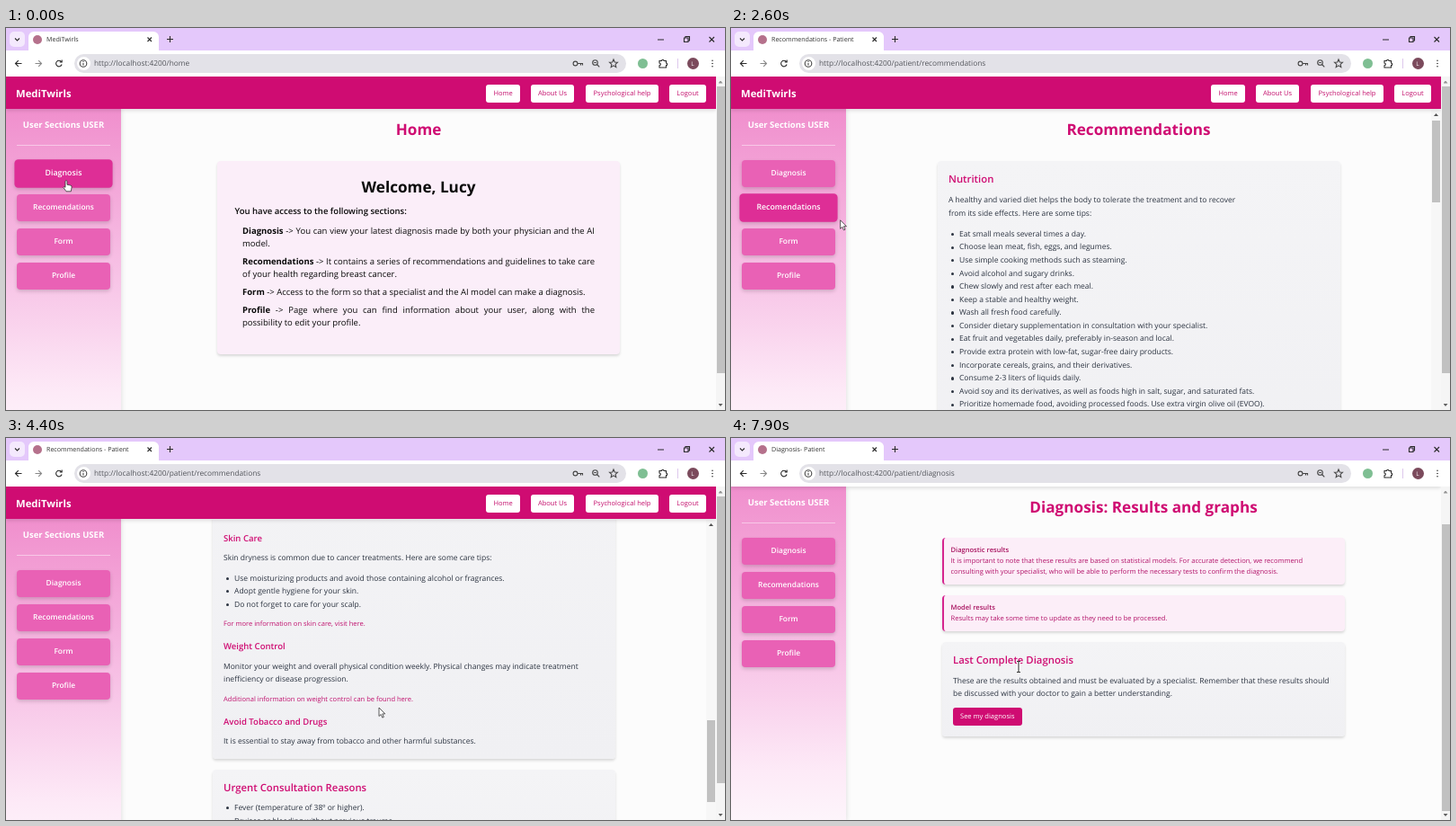
Recreate the animation shown at these times as an HTML page. Size 800 px wide and 425 px high, loop 8000 ms.

```html
<!DOCTYPE html>
<html lang="en">
<head>
<meta charset="utf-8">
<title>Patient portal</title>
<style>
html, body { margin: 0; width: 100%; height: 100%; overflow: hidden; background: #fff; }
div { position: absolute; box-sizing: border-box; }
#stage { left: 0; top: 0; width: 800px; height: 425px; overflow: hidden; background: #fcfcfc;
  font-family: "Open Sans", "Noto Sans", sans-serif; text-rendering: geometricPrecision; }
svg { position: absolute; left: 0; top: 0; }
.t { white-space: nowrap; line-height: 20px; }
.c { transform: translateX(-50%); }
.card { border-radius: 4px; box-shadow: 0 2px 3px rgba(0,0,0,.14); }
.grey { background: linear-gradient(#f4f4f6, #f0f0f3); }
</style>
</head>
<body>
<div id="stage"></div>
<script>
const LOOP = 8000, PINK = '#cf0c72', HOT = '#df3095', INK = '#2b3340', SOFT = '#434c59';
let root = document.getElementById('stage');
const stage = root;

// Drawing helpers: everything is placed in stage coordinates
function box(x, y, w, h, css = '', cls = '', html = '') {
  const d = document.createElement('div');
  d.className = cls;
  d.style.cssText = `left:${x}px;top:${y}px;width:${w}px;height:${h}px;${css}`;
  d.innerHTML = html;
  root.append(d);
  return d;
}
function text(x, y, size, s, css = '', cls = '') {
  return box(x, y - 10, 0, 20, `width:max-content;font-size:${size}px;${css}`, 't ' + cls, s);
}
function inside(parent, draw) {
  const old = root;
  root = parent;
  draw();
  root = old;
}
const h1 = (x, y, s, color = PINK) => text(x, y, 17.15, s, `font-weight:700;color:${color}`, 'c');
const h3 = (x, y, s, cls) => text(x, y, 11.35, s, `font-weight:600;color:${PINK}`, cls);
const h4 = (x, y, s, color = PINK) => text(x, y, 9.55, s, `font-weight:600;color:${color}`);
const body = (x, y, s, cls) => text(x, y, 8.5, s, `color:${INK}`, cls);
const small = (x, y, s, css = `color:${SOFT}`, cls) => text(x, y, 7.56, s, css, cls);
const link = (y, s) => small(242, y, s, 'color:#c0136f');
const card = (x, y, w, h, css, cls = 'grey') => box(x, y, w, h, css, 'card ' + cls);
const lines = (x, y, list) => list.forEach((s, i) => body(x, y + i * 14.58, s));
function bullets(y, list) {
  list.forEach((_, i) => box(245, y + i * 14.58 - 1.8, 3.2, 3.2, `background:${INK};border-radius:50%`));
  lines(254, y, list);
}
function button(x, y, w, h, s, bg, radius = 3) {
  box(x, y, w, h, `background:${bg};border-radius:${radius}px`);
  small(x + w / 2, y + h / 2, s, 'color:#fff', 'c');
}

// Page frame
const view = box(0, 54, 790, 371, 'overflow:hidden');
let web, main, pages = {}, thumb, bar, sideButtons;
inside(view, () => web = box(0, -54, 790, 500));
inside(web, () => {
  main = box(128, 91, 662, 371, 'overflow:hidden;background:#fcfcfc');
  box(0, 90, 128, 372, 'background:linear-gradient(#f08fcd,#f7c3e6 50%,#fdeaf7 85%,#fdf5fb);box-shadow:1px 0 5px rgba(0,0,0,.1)');
  text(64, 108, 9.5, 'User Sections USER', 'font-weight:700;color:#fff', 'c');
  box(12, 130, 104, 1, 'background:rgba(255,255,255,.45)');
  sideButtons = ['Diagnosis', 'Recomendations', 'Form', 'Profile'].map((s, i) => {
    const b = box(12, 147 + 38 * i, 104, 30.3, 'border-radius:4px;box-shadow:0 2px 4px rgba(0,0,0,.16)');
    inside(b, () => text(52, 15.2, 8.4, s, 'font-weight:600;color:#fff', 'c'));
    return b;
  });
  box(0, 54.4, 790, 36, `background:${PINK};box-shadow:0 2px 4px rgba(0,0,0,.12)`);
  text(11, 73.5, 11.3, 'MediTwirls', 'font-weight:700;color:#fff');
  [[534, 38, 'Home'], [584, 48, 'About Us'], [645, 81, 'Psychological help'], [738, 41, 'Logout']].forEach(([x, w, s]) => {
    box(x - .3, 62.5, w + .6, 20.3, 'background:#fff;border-radius:3px');
    text(x + w / 2, 73.2, 7.5, s, 'font-weight:500;color:#c4126e', 'c');
  });
});

function page(name, title, path, extra, draw) {
  inside(main, () => {
    const el = box(-128, -91, 790, 1600);
    pages[name] = { el, title, path, ...extra };
    inside(el, draw);
  });
}
// Draws a block shifted down by dy
const shifted = (dy, draw) => inside(box(0, dy, 790, 1), draw);

page('home', 'MediTwirls', 'home', {}, () => {
  h1(459, 114, 'Home');
  card(235, 148, 448, 215, 'background:#fbeef9', '');
  h1(459, 178, 'Welcome, Lucy', '#0a0a0a');
  h4(254.5, 204, 'You have access to the following sections:', '#0a0a0a');
  const row = (y, s, fill) =>
    box(263, y - 10, 392, 20, `font-size:9.5px;color:#0a0a0a;text-align-last:${fill ? 'justify' : 'left'}`, 't', s);
  row(226, '<b>Diagnosis</b> -&gt; You can view your latest diagnosis made by both your physician and the AI', true);
  row(240, 'model.');
  row(260, '<b>Recomendations</b> -&gt; It contains a series of recommendations and guidelines to take care', true);
  row(274, 'of your health regarding breast cancer.');
  row(294, '<b>Form</b> -&gt; Access to the form so that a specialist and the AI model can make a diagnosis.');
  row(314, '<b>Profile</b> -&gt; Page where you can find information about your user, along with the', true);
  row(328, 'possibility to edit your profile.');
});

page('profile', 'Profile - Patient', 'patient/profile', { thumb: 218, max: 220 }, () => {
  h1(453.5, 114, 'Profile');
  shifted(67, () => {
    card(168, 83, 571, 129, 'background:#fdfdfd', '');
    [[180, 95, 'Name:', 'Lucy', 1], [458, 95, 'Reference Hospital:', 'Hospital Valle de Lumera', 1],
     [180, 151, 'Zone:', 'Madrid', 1], [458, 151, 'Assigned Doctor:', 'Rosa', 0]].forEach(([x, y, k, v, edit]) => {
      box(x, y, 269.5, 48.5, 'border:1px solid #ececef;border-radius:4px');
      small(x + 8.5, y + 14, k, `font-weight:600;color:${SOFT}`);
      small(x + 8.5, y + (edit ? 30 : 26.5), v, 'color:#1f2937');
      if (edit) button(x + 235.5, y + 19.5, 25.5, 20.5, 'Edit', HOT, 10.5);
    });
    box(168, 224, 571, 1.6, `background:${PINK}`);
    [[168, 238, 'Form', 'Complete your information.', 'Go to form', 55],
     [459.5, 238, 'Diagnosis and Statistics', 'Check the diagnoses and health trends.', 'Consult statistics', 75],
     [168, 332, 'Recommendations', 'Our professionals want to advise you for your well-being.', 'Consult recommendations', 109]
    ].forEach(([x, y, head, info, label, w]) => {
      card(x, y, 280, 82);
      h4(x + 12, y + 19, head);
      small(x + 12, y + 36, info);
      button(x + 12, y + 49.5, w, 20, label, HOT);
    });
  });
  shifted(182, () => {
    box(229.5, 310.5, 448, 1.6, `background:${PINK}`);
    card(241, 336, 424.5, 84, `background:#fdfdfd;border-top:2px solid ${PINK}`, '');
    h3(453.5, 358.5, 'Your data is important to us!', 'c');
    const strong = s => `<b style="color:${PINK}">${s}</b>`;
    body(453.5, 381, `We remind you that you can consult our ${strong('Privacy Policy')} and the ${strong('Informed Consent')}`, 'c');
    small(453.5, 402, 'If you have any questions, feel free to contact us.', undefined, 'c');
  });
});

page('recs', 'Recommendations - Patient', 'patient/recommendations', { thumb: 91, max: 1044 }, () => {
  h1(453.5, 114, 'Recommendations');
  const panel = (top, bottom) => card(229.5, top, 448, bottom - top);
  shifted(241, () => {
    panel(-93, 254.5);
    h3(242, -72, 'Nutrition');
    lines(242, -49, ['A healthy and varied diet helps the body to tolerate the treatment and to recover',
      'from its side effects. Here are some tips:']);
    bullets(-11.2, ['Eat small meals several times a day.', 'Choose lean meat, fish, eggs, and legumes.',
      'Use simple cooking methods such as steaming.', 'Avoid alcohol and sugary drinks.',
      'Chew slowly and rest after each meal.', 'Keep a stable and healthy weight.', 'Wash all fresh food carefully.',
      'Consider dietary supplementation in consultation with your specialist.',
      'Eat fruit and vegetables daily, preferably in-season and local.',
      'Provide extra protein with low-fat, sugar-free dairy products.',
      'Incorporate cereals, grains, and their derivatives.', 'Consume 2-3 liters of liquids daily.',
      'Avoid soy and its derivatives, as well as foods high in salt, sugar, and saturated fats.',
      'Prioritize homemade food, avoiding processed foods. Use extra virgin olive oil (EVOO).']);
    lines(242, 201, ['Remember not to obsess over food. A balance and variety of nutrition, combined with moderate exercise,', 'is essential.']);
    link(237, 'For more information on nutrition, consult here.');
    panel(266.5, 430);
    h3(242, 287, 'Physical Activity');
    lines(242, 310, ['Regular exercise strengthens the physical and mental condition of the patient, helping to avoid some side', 'effects of the treatment.']);
    bullets(347.5, ['Engage in at least 30 minutes of physical activity daily.',
      'Avoid physical inactivity and resume your daily activities after the diagnosis.',
      'Include aerobic exercises, flexibility, stretching, and resistance exercises.',
      'Prefer outdoor activities that promote social interaction.']);
    link(412.5, 'More about the importance of exercise can be found here.');
  });
  shifted(860, () => {
    panel(-177, -64);
    h3(242, -156, 'Emotional Health');
    lines(242, -133, ['It is normal to feel fear, sadness, or anger after a diagnosis. Share your feelings with',
      'the people close to you and ask for professional help whenever you need it.', 'You are not alone.']);
    link(-82, 'For more information on emotional health, visit here.');
    panel(-52, 356.5);
    h3(242, -32, 'General Care');
    h4(242, -9, 'Rest and Sleep');
    body(242, 13.5, 'Tiredness is common during treatment. Here are some care tips:');
    bullets(36, ['Keep a regular sleep schedule.', 'Take short breaks during the day.', 'Avoid screens before going to bed.']);
    link(87, 'For more information on rest, visit here.');
    h4(242, 112, 'Skin Care');
    body(242, 134, 'Skin dryness is common due to cancer treatments. Here are some care tips:');
    bullets(156.5, ['Use moisturizing products and avoid those containing alcohol or fragrances.',
      'Adopt gentle hygiene for your skin.', 'Do not forget to care for your scalp.']);
    link(207, 'For more information on skin care, visit here.');
    h4(242, 232, 'Weight Control');
    lines(242, 254.5, ['Monitor your weight and overall physical condition weekly. Physical changes may indicate treatment', 'inefficiency or disease progression.']);
    link(290.5, 'Additional information on weight control can be found here.');
    h4(242, 315.5, 'Avoid Tobacco and Drugs');
    body(242, 337.5, 'It is essential to stay away from tobacco and other harmful substances.');
    panel(369, 505);
    h3(242, 389.5, 'Urgent Consultation Reasons');
    bullets(412, ['Fever (temperature of 38º or higher).', 'Bruises or bleeding without previous trauma.',
      'Allergic reaction.', 'Severe vomiting or diarrhea.', 'Shortness of breath or persistent cough.',
      'Intense abdominal or chest pain.']);
    panel(517, 614);
    h3(453.5, 537.5, 'Hope and Support', 'c');
    body(453.5, 560, 'Remember that a breast cancer diagnosis is not the end. There are numerous treatment and support', 'c');
    body(453.5, 574.6, 'options that allow you to maintain hope and improve your quality of life.', 'c');
    link(596, 'For more information on care and support, visit here.');
  });
});

page('diagnosis', 'Diagnosis- Patient', 'patient/diagnosis', {}, () => shifted(36, () => {
  h1(459, 78, 'Diagnosis: Results and graphs');
  const note = (y, h, head, list) => {
    card(235, y, 448, h, 'background:#fceef8;border-left:2px solid #d6248f', '');
    small(244.5, y + 14, head, 'font-weight:600;color:#a8125f');
    list.forEach((s, i) => small(244.5, y + 26 + 12 * i, s, 'color:#b3146a'));
  };
  note(111, 52, 'Diagnostic results', [
    'It is important to note that these results are based on statistical models. For accurate detection, we recommend',
    'consulting with your specialist, who will be able to perform the necessary tests to confirm the diagnosis.']);
  note(175, 40, 'Model results', ['Results may take some time to update as they need to be processed.']);
  card(235, 227, 448, 105);
  h3(247, 247.5, 'Last Complete Diagnosis');
  lines(247, 270.5, ['These are the results obtained and must be evaluated by a specialist. Remember that these results should',
    'be discussed with your doctor to gain a better understanding.']);
  button(247, 300, 76.5, 20, 'See my diagnosis', PINK);
}));

// Scrollbars
const arrow = (x, y, up, color) =>
  box(x - 2.5, y - 1.5, 5, 3, `background:${color};clip-path:polygon(${up ? '0 100%,50% 0,100% 100%' : '0 0,50% 100%,100% 0'})`);
inside(web, () => {
  bar = box(779, 91, 11, 371, 'background:#f7f7f7');
  inside(bar, () => {
    arrow(5.5, 5.5, true, '#505050');
    arrow(5.5, 365.5, false, '#606060');
    thumb = box(1, 12, 9, 91, 'background:#c1c1c1');
  });
  web.insertBefore(bar, main.nextSibling);
});
box(790, 54, 10, 371, 'background:#f5f5f5');
arrow(795, 60, true, '#909090');
arrow(795, 419.5, false, '#606060');
const outerThumb = box(791, 65, 8.5, 319, 'background:#c1c1c1');

// Browser window
box(0, 0, 800, 25, 'background:#e4c8fb');
box(0, 25, 800, 29, 'background:#fff');
box(4, 4, 17, 17, 'background:#f4e9fd;border-radius:5px');
box(25, 4, 145, 22, 'background:#fff;border-radius:6px 6px 0 0');
box(29.5, 8, 10, 10, 'background:#b5718c;border-radius:50%');
const tabTitle = text(45, 13, 7.1, '', 'color:#333');
box(76, 29, 614, 21, 'background:#e3e2e8;border-radius:10.5px');
box(78.5, 32, 15, 15, 'background:#fff;border-radius:50%');
const url = text(98, 39.5, 8.33, '', 'color:#54565c');
box(702.5, 34, 11, 11, 'background:#7fbf93;border-radius:50%');
box(747, 34, 1, 11, 'background:#ddc8ec');
box(757.5, 33, 13, 13, 'background:#7b4a5c;border-radius:50%');
text(764, 39.5, 6.5, 'L', 'color:#fff', 'c');
stage.insertAdjacentHTML('beforeend', `<svg width="800" height="54" fill="none" stroke="#2b2b2b" stroke-width="1.1">
<path d="M10 11.5l2.5 2.5 2.5-2.5M157.5 10.5l4.5 4.5m0-4.5l-4.5 4.5M179 12.5h7m-3.5-3.5v7M725 13h7M754.5 11h4.5v4.5h-4.5zM756 11v-1.5h4.5v4.5h-1.5M782.5 10l5.5 5.5m0-5.5l-5.5 5.5"/>
<path d="M17.5 39.5h-7m3.3-3.3l-3.3 3.3 3.3 3.3M61.5 37.5a3.3 3.3 0 1 0 .6 3M62.2 35.5v2.5h-2.5"/>
<path stroke="#888" d="M32.5 39.5h7m-3.3-3.3l3.3 3.3-3.3 3.3"/>
<g stroke="#444"><circle cx="86" cy="39.5" r="3.8"/><path d="M86 39v2.5M86 37v1"/>
<circle cx="633.5" cy="39.5" r="2.4"/><path d="M636 39.5h5.5v2m-2-2v2"/>
<circle cx="655.5" cy="38.5" r="2.8"/><path d="M657.5 40.5l2.8 2.8M654.2 38.5h2.6"/>
<path d="M676 35l1.3 3 3.2.3-2.4 2.1.7 3.2-2.8-1.7-2.8 1.7.7-3.2-2.4-2.1 3.2-.3z"/></g>
<path d="M727 36.5h2.5a1.3 1.3 0 0 1 2.6 0h2.4v2.5a1.3 1.3 0 0 1 0 2.6v2.4h-7.5v-2.3a1.3 1.3 0 0 0 0-2.7z"/>
<path stroke-width="1.6" stroke-linecap="round" d="M786 36.2v.01M786 39.5v.01M786 42.8v.01"/></svg>
<svg id="mouse" width="18" height="20" style="overflow:visible" fill="#fff" stroke="#333" stroke-width=".8" stroke-linejoin="round">
<path d="M0 0v9.5l2.2-2 1.6 3.6 1.6-.7-1.6-3.5h3z"/>
<path d="M-1 1q1-1.6 2 0v4l4 .8q1.3.4 1.1 2l-.8 4.7h-5.3l-3.2-4.5q0-1.5 2.2 0z"/>
<path stroke-width="1.1" d="M-2-6.5h1.5q.5 0 .5.5v11q0 .5-.5.5h-1.5M2-6.5h-1.5q-.5 0-.5.5v11q0 .5.5.5h1.5"/></svg>`);
const mouse = document.getElementById('mouse');

// Motion: [time, values...]
const mousePath = [[0, 67, 169.3], [400, 64, 272], [500, 64, 272], [800, 402, 227], [1000, 402, 227], [1900, 406, 219],
  [2300, 66, 198], [2500, 66, 198], [2900, 422, 299], [3600, 422, 299], [4400, 415, 300], [4800, 415, 300],
  [5000, 795, 200], [5400, 795, 236], [5900, 64, 205], [6200, 70, 204], [6300, 96, 180], [6700, 430, 345],
  [7100, 66, 130], [7400, 66, 130], [7900, 320, 255]];
const scrolls = { profile: [[800, 0], [1000, 67], [1900, 182]], recs: [[2900, 0], [3200, 241], [4400, 860], [4800, 1044]] };
const outerScroll = [[5000, 0], [5400, 36]];
const visits = [[0, 'home'], [500, 'profile'], [2500, 'recs'], [7400, 'diagnosis']];
// [button, on, off]
const hovers = [[0, -500, 100], [1, 150, 220], [2, 240, 310], [3, 320, 550], [1, 2250, 2600], [2, 5850, 6300], [1, 6320, 6400], [0, 7000, 7500]];
const clamp = v => Math.max(0, Math.min(1, v));
const smooth = u => u * u * (3 - 2 * u);

function along(keys, t, ease = u => u) {
  const i = keys.findLastIndex(k => k[0] <= t);
  if (i < 0) return keys[0].slice(1);
  const a = keys[i], b = keys[i + 1] || a;
  const u = ease(clamp((t - a[0]) / (b[0] - a[0] || 1)));
  return a.slice(1).map((v, j) => v + (b[j + 1] - v) * u);
}

function draw(t) {
  const name = visits.findLast(v => v[0] <= t)[1], now = pages[name];
  const [x, y] = along(mousePath, t, smooth), [outer] = along(outerScroll, t);
  const [scroll] = scrolls[name] ? along(scrolls[name], t) : [0];
  for (const k in pages) pages[k].el.style.display = k === name ? '' : 'none';
  now.el.style.transform = `translateY(${-scroll}px)`;
  web.style.transform = `translateY(${-outer}px)`;
  outerThumb.style.top = 65 + outer * 31 / 36 + 'px';
  bar.style.display = now.max ? '' : 'none';
  if (now.max) {
    thumb.style.height = now.thumb + 'px';
    thumb.style.top = 12 + scroll / now.max * (347 - now.thumb) + 'px';
  }
  tabTitle.textContent = now.title;
  url.textContent = 'http://localhost:4200/' + now.path;

  sideButtons.forEach((b, i) => {
    const h = hovers.filter(v => v[0] === i).reduce((m, [, on, off]) =>
      Math.max(m, clamp((t - on) / 200) - clamp((t - off) / 200)), 0);
    b.style.transform = `scale(${1 + .05 * h})`;
    b.style.background = `rgb(${233 - 11 * h},${97 - 51 * h},${181 - 31 * h})`;
  });

  const row = y + outer - 147;
  const onButton = x > 12 && x < 116 && row > 0 && row < 144 && row % 38 < 30;
  const kind = onButton ? 1 : t >= 7800 ? 2 : 0;
  [...mouse.children].forEach((p, i) => p.style.display = i === kind ? '' : 'none');
  mouse.style.transform = `translate(${x}px,${y}px)`;
}

const start = performance.now();
function tick() {
  const t = (performance.now() - start) % LOOP;
  draw(Math.floor(t / 100) * 100);
  requestAnimationFrame(tick);
}
tick();
</script>
</body>
</html>
```
